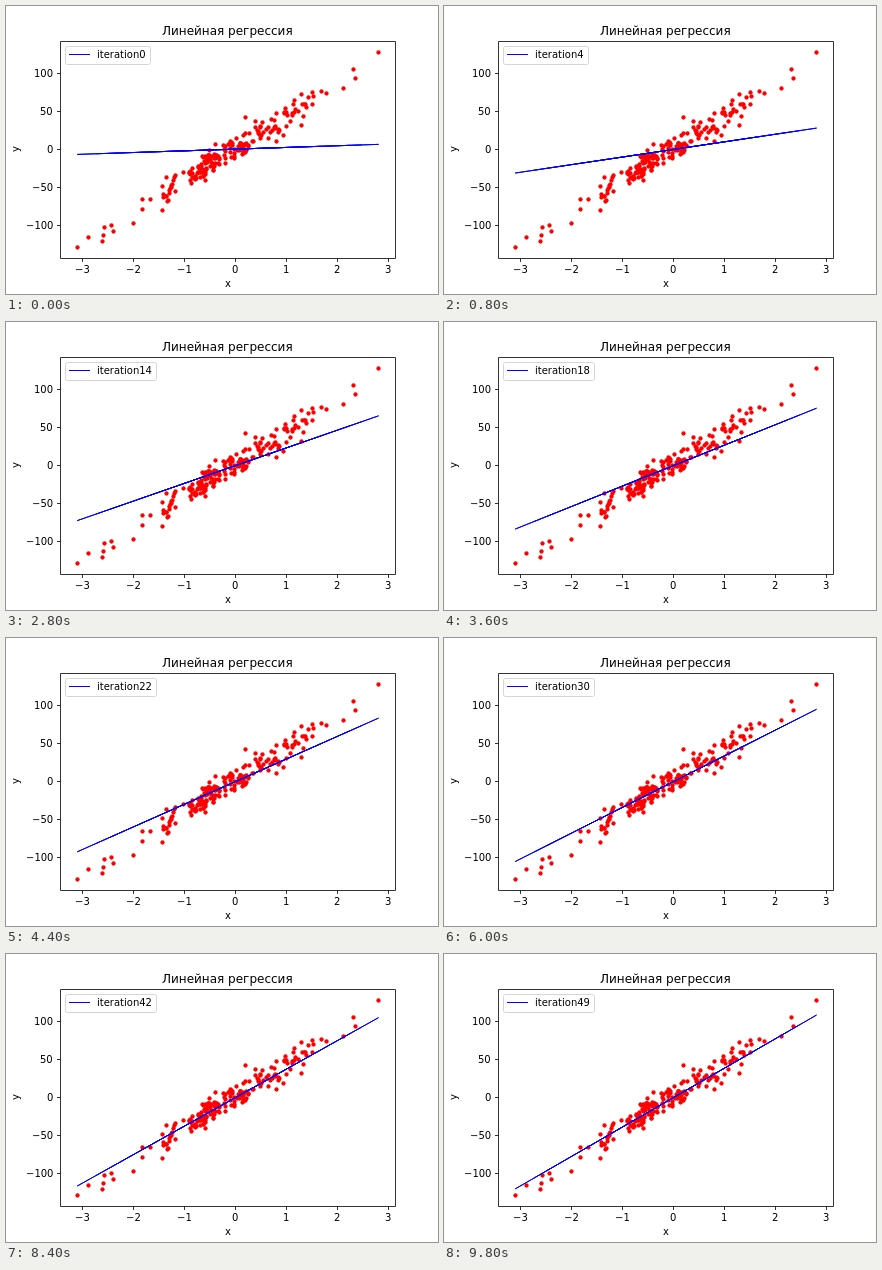
An HTML page for the animation above (10 s loop, 432x288 px).

```html
<!DOCTYPE html>
<html lang="ru">
<head>
<meta charset="utf-8">
<title>Линейная регрессия</title>
<style>
html, body { margin: 0; width: 100%; height: 100%; overflow: hidden; background: #fff; }
svg { display: block; width: 432px; height: 288px; }
text { font: 10px "DejaVu Sans", sans-serif; fill: #000; }
.title { font-size: 12px; }
.axis { stroke: #000; stroke-width: .8; fill: none; }
.frame { stroke-linejoin: miter; }
.fit { stroke: #00f; stroke-width: 1; stroke-linecap: square; }
</style>
</head>
<body>
<svg id="plot" viewBox="0 0 432 288"></svg>
<script>
const STEP = 200, COUNT = 50;
const SLOPE = 41.3, DECAY = 0.946;
const BIAS = -0.9, BIAS_DECAY = 0.8;
const X_MIN = -3.09, X_MAX = 2.8;
const px = x => 229.3 + 51 * x;
const py = y => 143 - 0.76 * y;

const plot = document.getElementById('plot');
function add(tag, attrs, content) {
  const el = document.createElementNS('http://www.w3.org/2000/svg', tag);
  for (const k in attrs) el.setAttribute(k, attrs[k]);
  if (content !== undefined) el.textContent = content;
  return plot.appendChild(el);
}
const signed = v => String(v).replace('-', '\u2212');

// Places text from a whole pixel; shift is the part of its width left of x
function label(x, y, s, shift, cls = '') {
  const el = add('text', { y, class: cls }, s);
  el.setAttribute('x', Math.round(x - shift * el.getComputedTextLength()));
  return el;
}

let seed = 29;
const rand = () => (seed = (seed * 16807) % 2147483647) / 2147483647;
const gauss = () => (rand() + rand() + rand() + rand() - 2) * 1.73;
const dot = (x, y) => add('circle', { cx: x + 0.5, cy: y + 0.5, r: 2.15, fill: '#f00' });

// Far points of both tails and a few strays
[
  [71, 241], [82, 231], [96, 235], [97, 229], [98, 221], [105, 219], [107, 225], [127, 217],
  [136, 203], [136, 193], [144, 193], [156, 204], [156, 180], [239, 111], [270, 135], [277, 129],
  [295, 119], [295, 88], [315, 85], [320, 87], [337, 82], [347, 63], [349, 72], [372, 46]
].forEach(p => dot(...p));

// Bands of noise around the true line: how many points, and from where to where
const bands = [[18, 157, 181], [30, 181, 200], [50, 196, 218], [34, 218, 238], [28, 236, 262], [34, 264, 312]];
for (const [count, from, to] of bands) {
  for (let n = 0; n < count; n++) {
    const x = from + (to - from) * rand();
    dot(Math.round(x), Math.round(142 - 0.61 * (x - 229) + 5.8 * gauss()));
  }
}

// Repeated strokes, densest near the centre, give the line its hard edge
const fits = [1, 1, 0.88, 0.8, 0.6, 0.45, 0.35].map(span => ({ span, el: add('line', { class: 'fit' }) }));

add('path', { class: 'axis frame', d: 'M54.5 35.5H389.5V252.5H54.5Z' });
for (let v = -3; v <= 3; v++) {
  const x = 229 + 51 * v;
  add('path', { class: 'axis', d: `M${x + 0.5} 252.5v3.5` });
  label(x + 0.3, 267, signed(v), 0.5);
}
for (let v = -100; v <= 100; v += 50) {
  const y = py(v);
  add('path', { class: 'axis', d: `M54.5 ${y + 0.5}h-3.5` });
  label(47, y + 4, signed(v), 1);
}
label(221.6, 28.6, 'Линейная регрессия', 0.5, 'title');
label(222, 281, 'x', 0.5);
add('text', { transform: 'translate(13 146) rotate(-90)' }, 'y');

const box = add('rect', {
  x: 59.5, y: 40.5, height: 18, rx: 2,
  fill: '#fff', 'fill-opacity': 0.8, stroke: '#ccc', 'stroke-opacity': 0.8
});
add('line', { class: 'fit', x1: 63.5, x2: 83.5, y1: 48.5, y2: 48.5 });
const caption = label(91, 52, '', 0);

function draw(ms) {
  const i = Math.floor(ms / STEP) % COUNT;
  const slope = SLOPE * (1 - DECAY ** (i + 1));
  const bias = BIAS * (1 - BIAS_DECAY ** (i + 1));
  for (const { span, el } of fits) {
    const a = X_MIN * span, b = X_MAX * span;
    el.setAttribute('x1', px(a));
    el.setAttribute('y1', py(slope * a + bias));
    el.setAttribute('x2', px(b));
    el.setAttribute('y2', py(slope * b + bias));
  }
  caption.textContent = 'iteration' + i;
  box.setAttribute('width', i < 10 ? 85 : 91);
}

const start = performance.now();
function tick() {
  draw(performance.now() - start);
  requestAnimationFrame(tick);
}
tick();
</script>
</body>
</html>
```
